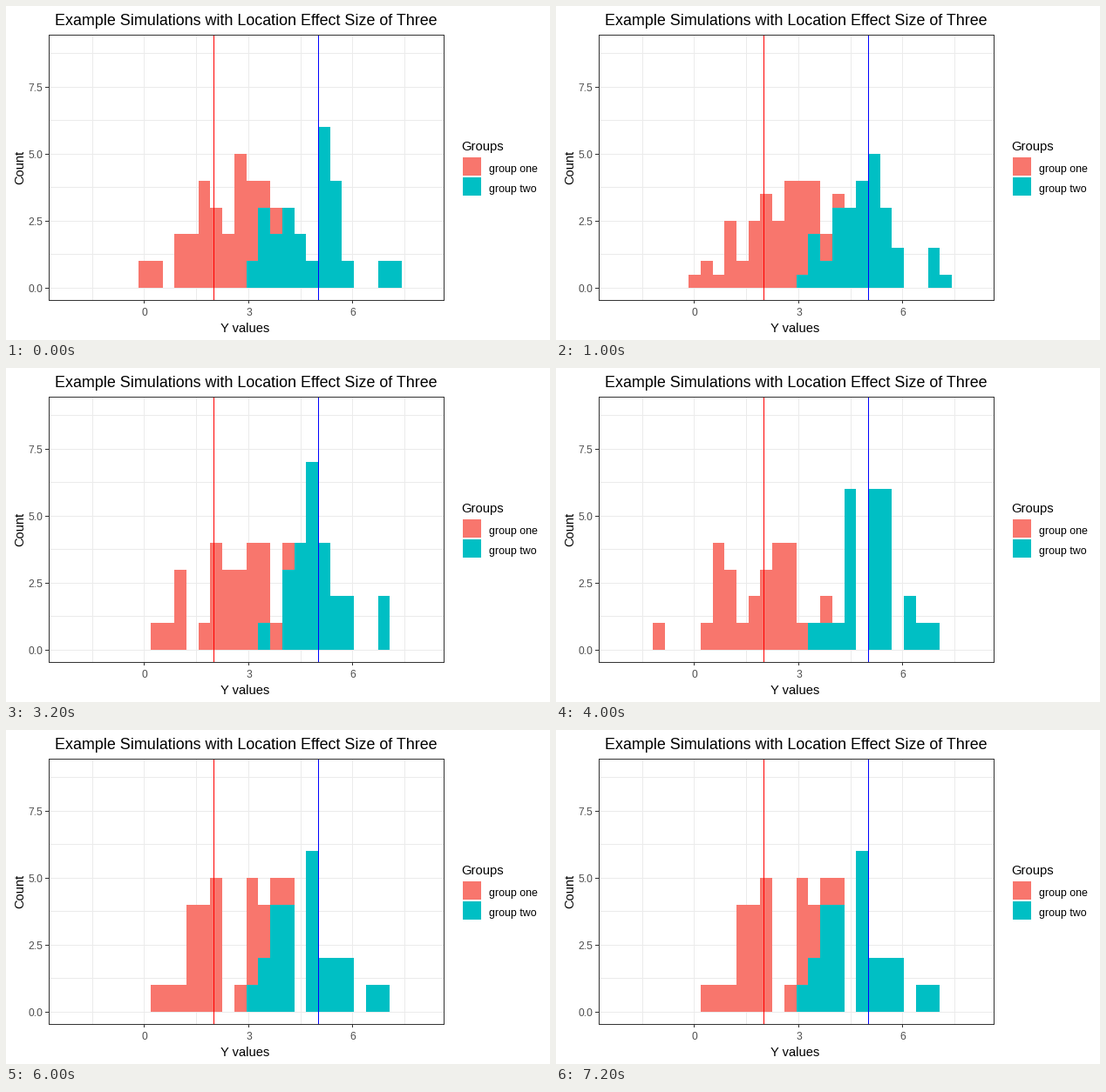
A matplotlib script that plays this animation: 624x384 px, repeating every 8 s.

```python
import numpy as np
import matplotlib.pyplot as plt
from matplotlib.animation import FuncAnimation
from matplotlib.patches import Rectangle

W, H, DPI = 624, 384, 100
RED, TEAL = "#F8766D", "#00BFC4"
GRID, DARK, LABEL = "#EBEBEB", "#333333", "#4D4D4D"
LEFT, RIGHT, TOP, BOTTOM = 49, 502, 33, 338
BINS, BIN_X, BIN_W = 25, 111.0, 13.72
BASE, UNIT = 324, 30.8

plt.rcParams["font.family"] = "Liberation Sans"
fig = plt.figure(figsize=(W / DPI, H / DPI), dpi=DPI, facecolor="white")
ax = fig.add_axes([0, 0, 1, 1])
ax.set_xlim(0, W)
ax.set_ylim(H, 0)
ax.axis("off")


def box(x, y, w, h, color, z=1):
    """Fill whole pixels, with the top left corner at (x, y)."""
    return ax.add_patch(Rectangle((x, y), w, h, facecolor=color, linewidth=0,
                                  antialiased=False, zorder=z))


def label(x, y, text, px, color="black", ha="left", rotation=0):
    ax.text(x, y, text, fontsize=px * 72 / DPI, color=color, ha=ha,
            va="baseline", rotation=rotation, rotation_mode="anchor")


def heights(start, counts):
    out = np.zeros(BINS)
    out[start:start + len(counts)] = counts
    return out


# Each sample: counts for group one, then group two, from a first bin on.
SAMPLES = [
    (heights(3, [1, 1, 0, 2, 2, 4, 3, 2, 5, 4, 4, 3, 3]),
     heights(12, [1, 3, 2, 3, 2, 1, 6, 4, 1, 0, 0, 1, 1])),
    (heights(4, [1, 1, 3, 0, 1, 4, 3, 3, 4, 4, 1, 4]),
     heights(13, [1, 0, 3, 4, 7, 4, 2, 2, 0, 0, 2])),
    (heights(0, [1, 0, 0, 0, 1, 4, 3, 1, 2, 3, 4, 4, 1, 0, 2]),
     heights(13, [1, 1, 1, 6, 0, 6, 6, 0, 2, 1, 1])),
    (heights(4, [1, 1, 1, 4, 4, 5, 0, 1, 5, 4, 5, 5]),
     heights(12, [1, 2, 4, 4, 0, 6, 2, 2, 2, 0, 1, 1])),
]
# Position between samples for each second; 0.5 is halfway from first to second.
STEPS = [0, 0.5, 1, 1, 2, 2, 3, 3]

# Grid, ticks and tick labels
for x in (99, 158, 218, 278, 338, 397, 457):
    box(x, TOP, 1, BOTTOM - TOP, GRID)
for y in (54, 93, 131, 170, 208, 247, 285, 324):
    box(LEFT, y, RIGHT - LEFT, 1, GRID)
for x, text in ((158, "0"), (278, "3"), (397, "6")):
    box(x, BOTTOM + 1, 1, 3, DARK)
    label(x + 0.5, 356, text, 12, LABEL, "center")
for i in range(4):
    y = BASE - 77 * i
    box(LEFT - 4, y, 4, 1, DARK)
    label(42.5, y + 5, f"{2.5 * i:.1f}", 12, LABEL, "right")

# Bars, group two in front
edges = np.round(BIN_X + BIN_W * np.arange(BINS + 1))
bars = [[box(a, BASE, b - a, 0, color, z) for a, b in zip(edges, edges[1:])]
        for color, z in ((RED, 2), (TEAL, 3))]

# Mean lines and panel border
box(238, TOP, 1, BOTTOM - TOP, "#FF0000", 4)
box(358, TOP, 1, BOTTOM - TOP, "#0000FF", 4)
for y in (TOP, BOTTOM):
    box(LEFT, y, RIGHT - LEFT + 1, 1, DARK, 5)
for x in (LEFT, RIGHT):
    box(x, TOP, 1, BOTTOM - TOP + 1, DARK, 5)

# Titles and legend
label(275.5, 22, "Example Simulations with Location Effect Size of Three", 17.9,
      ha="center")
label(274.5, 375, "Y values", 14.67, ha="center")
label(20, 185.5, "Count", 14.67, ha="center", rotation=90)
label(522.5, 166, "Groups", 14.8)
for y, color, text in ((174, RED, "group one"), (197, TEAL, "group two")):
    box(524, y, 21, 21, color)
    label(554, y + 17, text, 12.4)


def update(frame):
    i, mix = divmod(STEPS[frame], 1)
    now = SAMPLES[int(i)]
    after = SAMPLES[min(int(i) + 1, len(SAMPLES) - 1)]
    for group, a, b in zip(bars, now, after):
        for bar, count in zip(group, a + (b - a) * mix):
            top = round(BASE - UNIT * count)
            bar.set_y(top)
            bar.set_height(BASE - top)
    return bars[0] + bars[1]


anim = FuncAnimation(fig, update, frames=len(STEPS), interval=1000,
                     repeat=True, repeat_delay=0)
plt.show()
```
